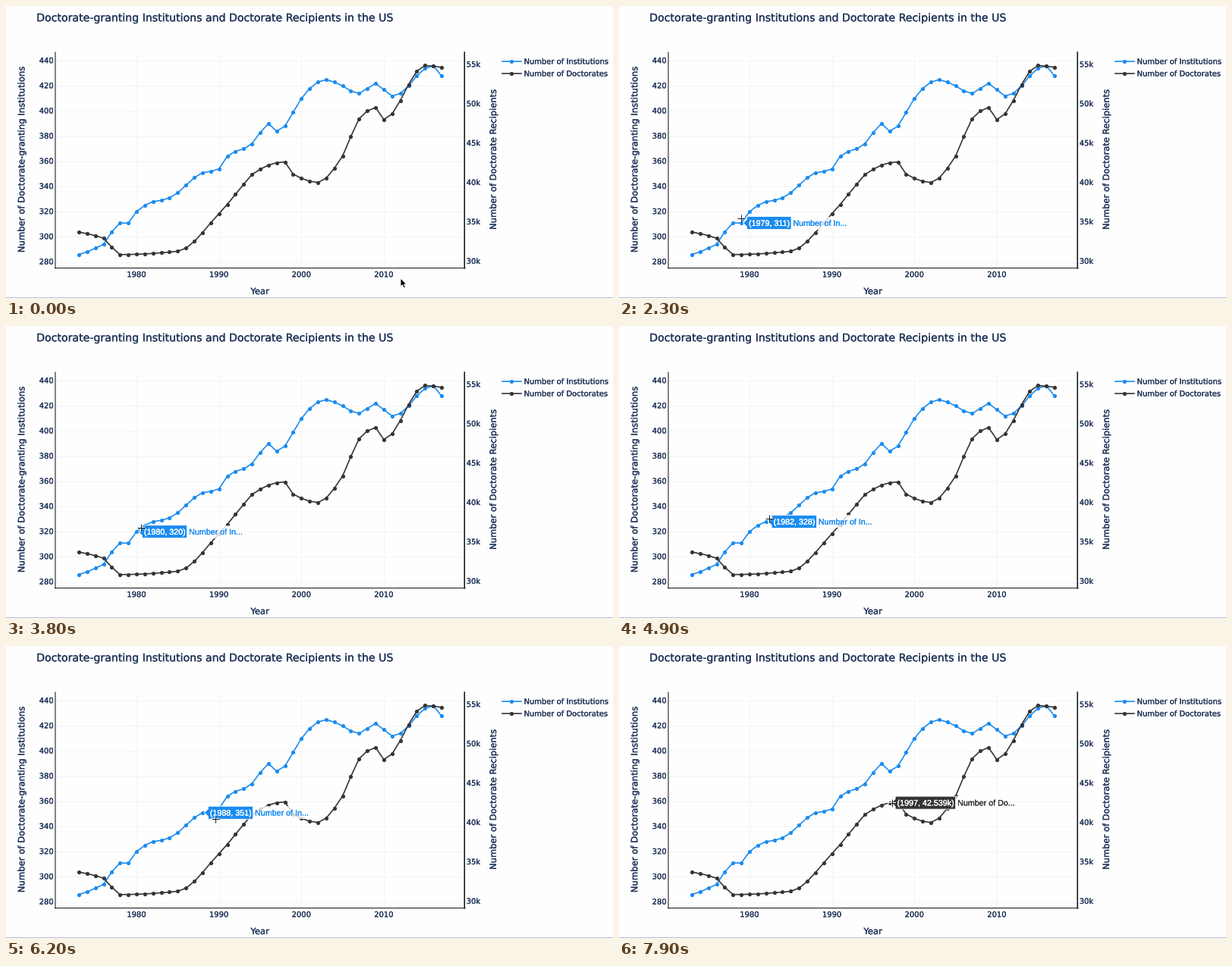
Recreate the animation shown at these times as a matplotlib script. Size 800 px wide and 385 px high, loop 8000 ms.

```python
import numpy as np
import matplotlib
import matplotlib.pyplot as plt
from matplotlib import patheffects
from matplotlib.animation import FuncAnimation
from matplotlib.patches import Polygon, Rectangle

matplotlib.rcParams["toolbar"] = "None"
matplotlib.rcParams["text.hinting"] = "none"

W, H, DPI = 800, 385, 100
STEP, FRAMES = 100, 80
PX = 72 / DPI
SCALE = 0.824                      # chart units to stage pixels
PAPER, INK = "#fefefe", "#22355a"
BLUE, DARK, GRID = "#1a8cf0", "#363435", "#f3f4fa"
MARK = 5.2


def smooth(x, keys):
    """Cubic through (x, y) keys that never overshoots them."""
    kx, ky = np.array(keys, float).T
    h = np.diff(kx)
    s = np.diff(ky) / h
    a, b = np.append(s[0], s), np.append(s, s[-1])
    m = np.where(a * b > 0, np.sign(a) * 2 * a * b / (abs(a + b) + 1e-9), 0)
    i = np.clip(np.searchsorted(kx, x, "right") - 1, 0, len(h) - 1)
    t = (x - kx[i]) / h[i]
    ease = t * t * (3 - 2 * t)
    bend = h[i] * t * (1 - t) * ((1 - t) * m[i] - t * m[i + 1])
    return ky[i] + (ky[i + 1] - ky[i]) * ease + bend


# Turning points of both curves
years = np.arange(1973, 2018)
institutions = np.rint(smooth(years, [
    (1973, 286), (1976, 294), (1978, 311), (1979, 311), (1980, 320),
    (1982, 328), (1984, 331), (1988, 351), (1990, 354), (1991, 364),
    (1994, 374), (1996, 390), (1997, 384), (2001, 418), (2003, 425),
    (2007, 414), (2009, 422), (2011, 412), (2016, 436), (2017, 428)]))
doctorates = smooth(years, [
    (1973, 33.755), (1976, 32.946), (1978, 30.875), (1985, 31.297),
    (1990, 36.067), (1993, 39.801), (1994, 41.034), (1997, 42.539),
    (1998, 42.638), (1999, 41.097), (2002, 40.031), (2005, 43.385),
    (2007, 48.133), (2009, 49.553), (2010, 48.028), (2015, 54.886),
    (2017, 54.664)]).round(3)


def x_of(year):
    return 172 + (year - 1980) * 10.865


def y_left(v):
    return 337.5 - (v - 280) * 1.658


def y_right(v):
    return 336.8 - (v - 30) * 10.38


fig = plt.figure(figsize=(W / DPI, H / DPI), dpi=DPI, facecolor=PAPER)
ax = fig.add_axes([0, 0, 1, 1])
ax.set_xlim(0, W)
ax.set_ylim(H, 0)
ax.axis("off")


def line(xs, ys, color, width, z=1, **kw):
    return ax.plot(xs, ys, color=color, lw=width * PX, zorder=z, **kw)[0]


def embolden(text, color):
    text.set_color(color)
    text.set_path_effects([patheffects.withStroke(linewidth=0.25 * PX, foreground=color)])


def label(x, y, s, size, ha="left", rot=0, color=INK, font="DejaVu Sans", z=3):
    text = ax.text(x, y, s, fontsize=size * PX, ha=ha, va="baseline",
                   rotation=rot, rotation_mode="anchor", family=font, zorder=z)
    embolden(text, color)
    return text


def series(xs, ys, color, z):
    line(xs, ys, color, 2 * SCALE, z, solid_joinstyle="round")
    line(xs, ys, color, 0, z + 0.1, marker="o", ms=MARK * PX, mew=0, ls="")


# Grid, axes and ticks
for year in range(1980, 2011, 10):
    x = x_of(year)
    line([x, x], [61, 345], GRID, 1)
    label(x, 357.3, str(year), 9.95, "center")
for v in range(280, 441, 20):
    y = y_left(v)
    line([66, 603], [y, y], GRID, 1)
    label(62.8, y + 3, str(v), 9.95, "right")
for v in range(30, 56, 5):
    label(606.8, y_right(v) + 3, f"{v}k", 9.95)

line([65, 65], [61, 345.8], "#222222", 1.1, 2, snap=False)
line([64.6, 605], [345.5, 345.5], "#222222", 1.1, 2, snap=False)
line([604.3, 604.3], [61, 345.8], "#0a0a0a", 1.5, 2, snap=False)
line([0, W], [384, 384], "#b9bce8", 1)

label(40.2, 20.2, "Doctorate-granting Institutions and Doctorate Recipients in the US", 14.12)
label(334.6, 380, "Year", 11.5, "center")
label(24.3, 202.6, "Number of Doctorate-granting Institutions", 11.65, "center", 90)
label(646, 202.5, "Number of Doctorate Recipients", 11.52, "center", 90)

# Traces and legend
xs = x_of(years)
series(xs, y_left(institutions), BLUE, 4)
series(xs, y_right(doctorates), DARK, 5)
for y, name, color in ((73, "Number of Institutions", BLUE),
                       (89, "Number of Doctorates", DARK)):
    line([654, 678.5], [y, y], color, 2 * SCALE, 4)
    line([666.2], [y], color, 0, 4, marker="o", ms=MARK * PX, mew=0)
    label(682.6, y + 3.5, name, 9.95)

# Hover label
points = np.vstack([np.column_stack([xs, y_left(institutions)]),
                    np.column_stack([xs, y_right(doctorates)])])
tag = ax.add_patch(Polygon([(0, 0), (1, 1), (1, 0)], ec=PAPER, lw=SCALE * PX, zorder=7))
veil = ax.add_patch(Rectangle((0, 0), 1, 1, fc=PAPER, alpha=0.8, lw=0, zorder=6))
value = label(0, 0, "", 13 * SCALE, font="Liberation Sans", color="white", z=8)
name = label(0, 0, "", 13 * SCALE, font="Liberation Sans", z=8)

# Pointers
ARROW = np.array([(0, 0), (0, 11), (2.5, 8.7), (4.3, 12.8), (6.3, 12),
                  (4.6, 8), (7.9, 7.8)])
arrow = ax.add_patch(Polygon(ARROW, fc="black", ec="white", lw=0.9 * PX, zorder=10))
cross = [line([], [], c, w, 10, solid_capstyle="butt")
         for c, w in (("white", 2.2), ("#1c1c1c", 1))]

# Pointer stops: time, x, y
PATH = np.array([
    (200, 520, 359), (700, 187, 281.5), (1400, 158.5, 281.5),
    (2200, 158.5, 281.5), (2800, 172.5, 269.5), (3500, 172.5, 269.5),
    (4900, 197.5, 253.5), (6100, 264, 231), (6500, 310, 220.3),
    (6900, 310, 220.3), (7800, 359.5, 207)])
FOCUS = 1800                       # the chart reacts from here on


def mouse(t):
    return np.array([np.interp(t, PATH[:, 0], PATH[:, k]) for k in (1, 2)])


def text_width(t):
    return t.get_window_extent(fig.canvas.get_renderer()).width


def show_hover(i):
    x, y = points[i]
    x += 3 * SCALE
    k = i % len(years)
    if i < len(years):
        color, short, num = BLUE, "Number of In...", f"{institutions[k]:g}"
    else:
        color, short, num = DARK, "Number of Do...", f"{doctorates[k]:g}k"
    value.set_text(f"({years[k]}, {num})")
    name.set_text(short)
    embolden(name, color)
    pad, tip, half = 3 * SCALE, 6 * SCALE, 8.5
    left = x + tip
    right = left + text_width(value) + 1.7 * pad
    tag.set_xy([(x, y), (left, y - tip), (left, y - half), (right, y - half),
                (right, y + half), (left, y + half), (left, y + tip)])
    tag.set_facecolor(color)
    value.set_position((left + pad, y + 3.8))
    name.set_position((right + pad, y + 3.8))
    veil.set_bounds(right, y - half, text_width(name) + 2 * pad, 2 * half)


def update(n):
    t = n * STEP
    x, y = mouse(t)
    active = t >= FOCUS
    arrow.set_xy(ARROW + (x, y))
    arrow.set_visible(not active)
    for bars, r in zip(cross, (5.6, 5)):
        bars.set_data([x - r, x + r, np.nan, x, x], [y, y, np.nan, y - r, y + r])
        bars.set_visible(active)

    # The label trails the pointer by one step
    dist = np.hypot(*(points - mouse(t - STEP)).T)
    near = int(dist.argmin())
    hover = active and dist[near] < 20 * SCALE
    if hover:
        show_hover(near)
    for part in (tag, veil, value, name):
        part.set_visible(hover)
    return [arrow, *cross, tag, veil, value, name]


anim = FuncAnimation(fig, update, frames=FRAMES, interval=STEP,
                     init_func=lambda: update(0), repeat=True, repeat_delay=0)
plt.show()
```
